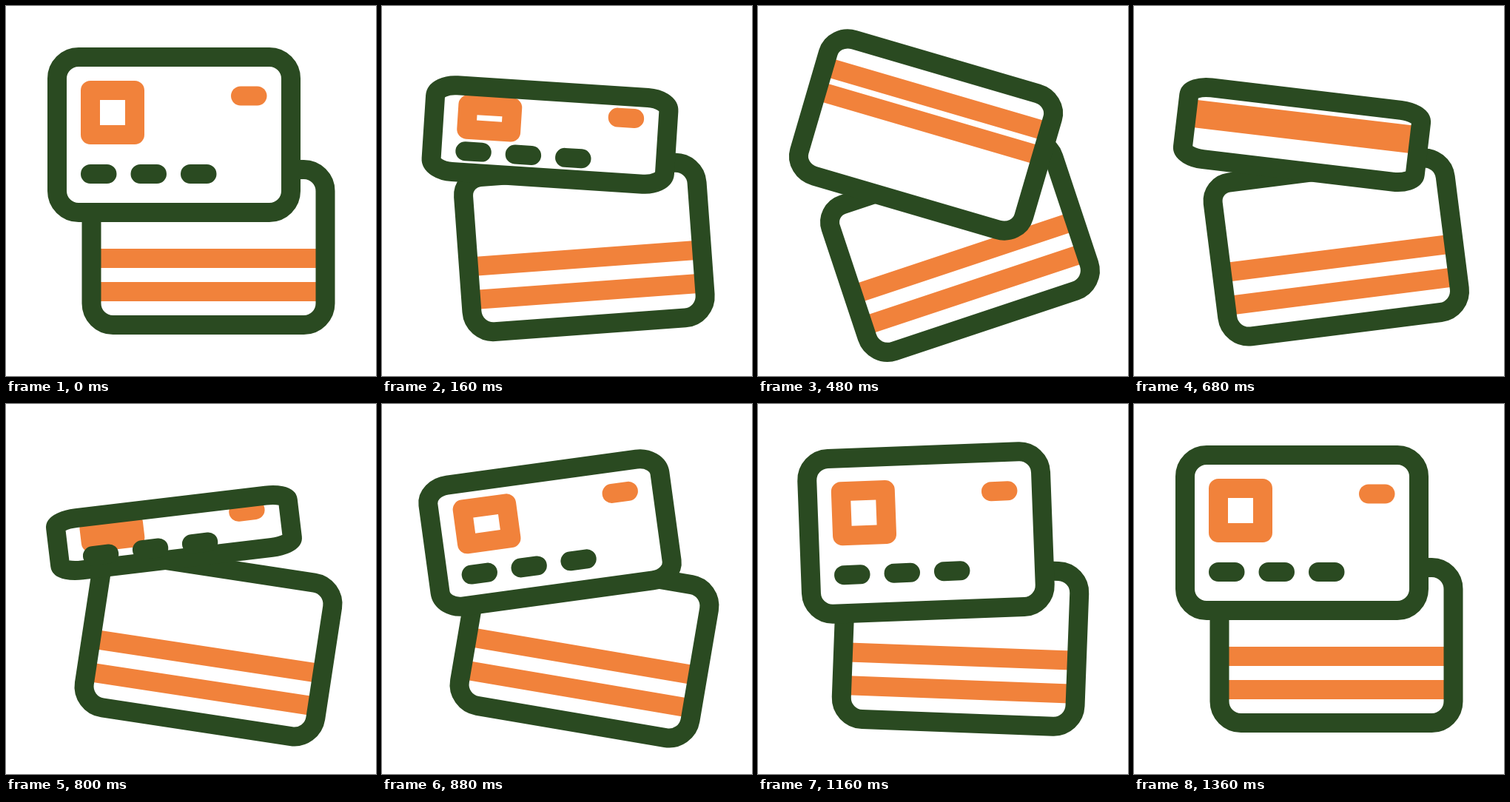
Write an HTML page that moves like this. It is 500 px wide and 500 px high and loops after 2 s.

```html
<!DOCTYPE html>
<html lang="en">
<head>
<meta charset="utf-8">
<title>Flipping cards</title>
<style>
  html, body { margin: 0; height: 100%; overflow: hidden; background: #fff; }
  svg { display: block; width: 100vw; height: 100vh; }
  svg * { stroke-width: 26; fill: none; }
  .green { stroke: #2a4a21; }
  .orange { stroke: #f1823b; stroke-linejoin: round; }
  .round { stroke-linecap: round; }
  .paper { fill: #fff; }
</style>
</head>
<body>
<svg viewBox="0 0 500 500">
  <g id="back">
    <rect class="paper" x="-158" y="-105" width="316" height="210" rx="29"/>
    <path class="orange" d="M-150 15H150M-150 60H150"/>
    <path class="green" d="M-133-105H129a29 29 0 0 1 29 29V76a29 29 0 0 1-29 29H-129a29 29 0 0 1-29-29V-80a25 25 0 0 1 25-25z"/>
  </g>
  <g id="front">
    <rect class="paper edge" x="-158" width="316" rx="29"/>
    <g id="face">
      <rect id="chip" class="orange" x="-113" width="60"/>
      <path id="pill" class="orange round"/>
    </g>
    <path id="stripes" class="orange"/>
    <rect class="green edge" x="-158" width="316" rx="29"/>
    <path id="dashes" class="green round"/>
  </g>
</svg>
<script>
const LOOP = 2000, STEP = 40;

// [time, value] rows
const frontTurn = [[0, 0], [552, 17.3], [850, -9.1], [1005, 3.05], [1167, -2.2], [1345, 0]];
const backTurn = [[0, 0], [552, -19.5], [850, 11.3], [1005, -3.8], [1167, 2.2], [1345, 0]];
const flip = [[0, 1], [540, -1], [960, 1]];

const $ = id => document.getElementById(id);
const edges = document.querySelectorAll('.edge');
const ease = p => 0.88 * p * p * (3 - 2 * p) + 0.12 * p;

function valueAt(keys, t) {
  for (let i = 1; i < keys.length; i++) {
    const [t0, a] = keys[i - 1], [t1, b] = keys[i];
    if (t < t1) return a + (b - a) * ease((t - t0) / (t1 - t0));
  }
  return keys[keys.length - 1][1];
}

function setBox(el, y, h) {
  el.setAttribute('y', y);
  el.setAttribute('height', Math.max(h, 0.01));
}

const place = (id, x, y, turn) =>
  $(id).setAttribute('transform', `translate(${x} ${y}) rotate(${turn})`);

function draw(t) {
  place('back', 273.5, 326, valueAt(backTurn, t));
  place('front', 227, 174, valueAt(frontTurn, t));

  // The outline keeps its weight while the card is squeezed vertically.
  const k = valueAt(flip, t), h = Math.abs(k), faceUp = k > 0;
  for (const el of edges) {
    setBox(el, -105 * h, 210 * h);
    el.setAttribute('ry', 29 * h);
  }

  $('face').style.display = $('dashes').style.display = faceUp ? '' : 'none';
  $('stripes').style.display = faceUp ? 'none' : '';
  if (faceUp) {
    setBox($('chip'), -60 * h, 60 * h);
    $('pill').setAttribute('d', `M90 ${-52.5 * h}h22.5`);
    $('dashes').setAttribute('d',
      [-113, -45.5, 22].map(x => `M${x} ${53 * h}h22.5`).join(''));
  } else {
    const spread = Math.max(0, (h - 0.23) / 0.77);
    $('stripes').setAttribute('d',
      [-56.5, -18].map(y => `M-150 ${y * spread}H150`).join(''));
  }
}

const start = performance.now();
function tick() {
  const t = (performance.now() - start) % LOOP;
  draw(Math.floor(t / STEP) * STEP);
  requestAnimationFrame(tick);
}
tick();
</script>
</body>
</html>
```
